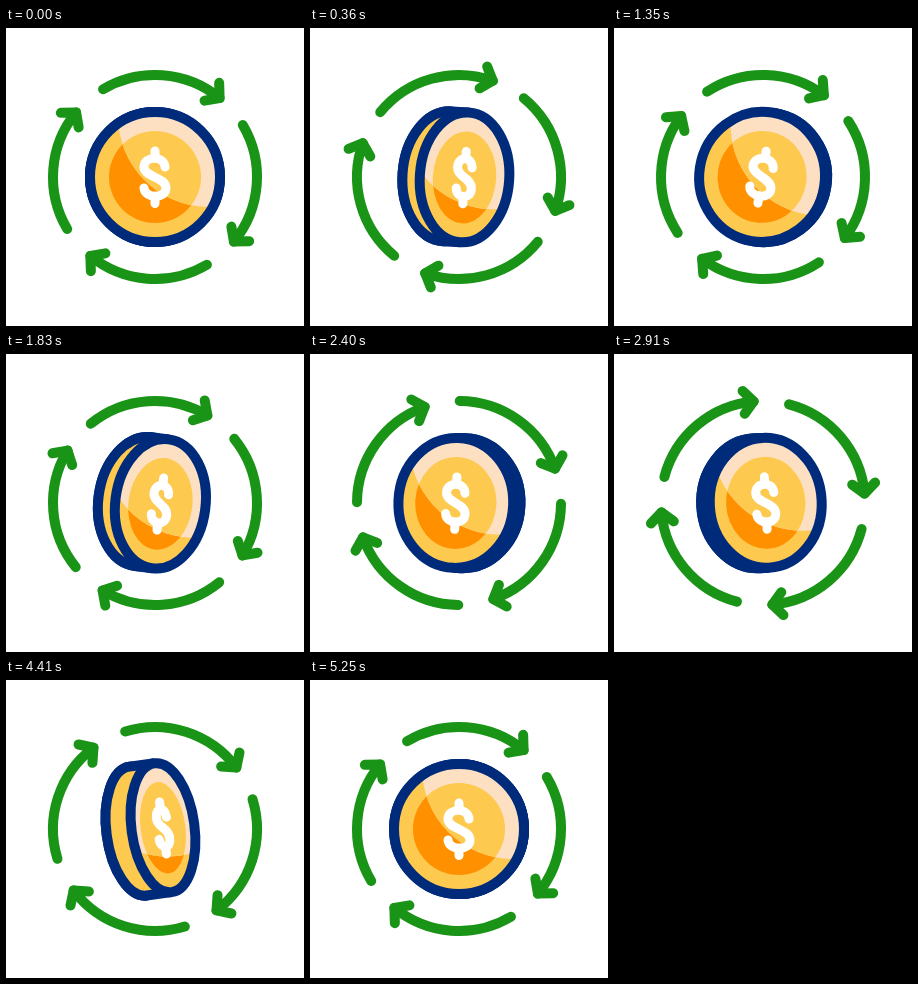
Animation, 298 px wide and 298 px high, one loop 5400 ms. Source, as an HTML page:

```html
<!DOCTYPE html>
<html lang="en">
<head>
<meta charset="utf-8">
<title>Coin cycle</title>
<style>
  html, body { margin: 0; width: 100%; height: 100%; overflow: hidden; background: #fff; }
  svg { display: block; width: 100vw; height: 100vh; }
  .arrow { fill: none; stroke: #1a9416; stroke-width: 10; stroke-linecap: round; stroke-linejoin: round; }
  .rim { fill: #fdc94f; stroke: #002a7a; stroke-width: 10; stroke-linejoin: round; }
  .sign { fill: none; stroke: #fff; stroke-width: 9; stroke-linecap: round; stroke-linejoin: round; vector-effect: non-scaling-stroke; }
</style>
</head>
<body>
<svg viewBox="0 0 298 298">
  <defs>
    <clipPath id="disc"><circle r="65"/></clipPath>
    <clipPath id="shine"><ellipse id="glow" cy="-61" ry="91"/></clipPath>
    <g id="arrow" class="arrow">
      <path id="arc"/>
      <path id="head"/>
    </g>
  </defs>
  <g id="ring">
    <use href="#arrow"/>
    <use href="#arrow" transform="rotate(90)"/>
    <use href="#arrow" transform="rotate(180)"/>
    <use href="#arrow" transform="rotate(270)"/>
  </g>
  <g id="coin">
    <ellipse id="back" class="rim" ry="65"/>
    <path id="side" class="rim"/>
    <g id="face">
      <g clip-path="url(#disc)">
        <circle r="65" fill="#fdc94f"/>
        <circle r="46" fill="#ff9100"/>
        <g clip-path="url(#shine)">
          <circle r="65" fill="#fddfc2"/>
          <circle r="46" fill="#fdc94f"/>
        </g>
        <path class="sign" d="M10-10C9-22-11-21-11-10C-11 0 11 0 11 11C11 22-10 22-11 11M0-26V-19M0 19V26.5"/>
      </g>
    </g>
    <ellipse id="front" class="rim" ry="65" style="fill:none"/>
  </g>
</svg>
<script>
const LOOP = 5400, STEP = 30, END = 5250;
const $ = id => document.getElementById(id);
const rad = deg => deg * Math.PI / 180;
const set = (id, attrs) => {
  for (const name in attrs) $(id).setAttribute(name, attrs[name]);
};

// Arrow shape: an arc around the centre, zero degrees pointing up.
const R = 102, FROM = -30.6, TO = 39.3;
const polar = (r, deg) => [r * Math.sin(rad(deg)), -r * Math.cos(rad(deg))];
const [tx, ty] = polar(R, TO);
const barb = side => {
  const [nx, ny] = polar(11.5 * side, TO), [bx, by] = polar(10, TO - 90);
  return [tx + nx + bx, ty + ny + by];
};
set('arc', { d: `M${polar(R, FROM)}A${R} ${R} 0 0 1 ${tx} ${ty}` });
set('head', { d: `M${barb(1)}L${tx} ${ty}L${barb(-1)}` });

// Smooth curve through [time, value] keys that never overshoots them.
function curve(keys) {
  const slope = keys.slice(1).map(([t, v], i) => (v - keys[i][1]) / (t - keys[i][0]));
  const tangent = keys.map((_, i) => {
    const a = slope[i - 1] ?? slope[i], b = slope[i] ?? a;
    return a * b > 0 ? 2 * a * b / (a + b) : 0;
  });
  return t => {
    let i = 0;
    while (i < slope.length - 1 && t > keys[i + 1][0]) i++;
    const [t0, v0] = keys[i], [t1, v1] = keys[i + 1];
    const h = t1 - t0, u = (t - t0) / h, w = 1 - u;
    return w * w * (1 + 2 * u) * v0 + u * u * (1 + 2 * w) * v1
      + h * u * w * (w * tangent[i] - u * tangent[i + 1]);
  };
}

// The ring winds back, sweeps a full turn past its goal and settles.
const turn = curve([[0, 0], [570, -29], [780, -33.8], [960, -36], [1830, 81.6],
  [2400, 211], [3510, 385.6], [4410, 373.6], [END, 360]]);
// The coin makes two turns.
const spin = curve([[0, 0], [780, 100], [1830, 226], [2400, 332],
  [3510, 456], [4410, 601], [END, 720]]);

function draw(t) {
  set('ring', { transform: `translate(149 149) rotate(${turn(t)})` });

  const a = rad(spin(t)), sin = Math.sin(a), cos = Math.cos(a);
  const dir = Math.sign(sin * cos) || 1;
  const squash = Math.max(Math.abs(cos), 0.02);
  const edge = sin * sin, depth = 33 * edge * dir;
  const near = depth * 0.38, far = -depth * 0.62, rx = 65 * squash;
  const lean = 9 * Math.sin(2 * Math.PI * t / END);

  set('coin', { transform: `translate(${149 - 2 * edge} 149) rotate(${lean})` });
  set('back', { cx: far, rx });
  // The far half ellipse closes the side wall.
  const sweep = dir > 0 ? 0 : 1;
  set('side', { d: `M${near}-65L${far}-65A${rx} 65 0 0 ${sweep} ${far} 65L${near} 65` });
  set('face', { transform: `translate(${near}) scale(${squash} 1)` });
  // The reflection stays round while the face narrows.
  set('glow', { cx: 54 * squash, rx: 91 / squash });
  set('front', { cx: near, rx });
}

const start = performance.now();
function tick() {
  const t = (performance.now() - start) % LOOP;
  draw(Math.min(Math.floor(t / STEP) * STEP, END));
  requestAnimationFrame(tick);
}
tick();
</script>
</body>
</html>
```
